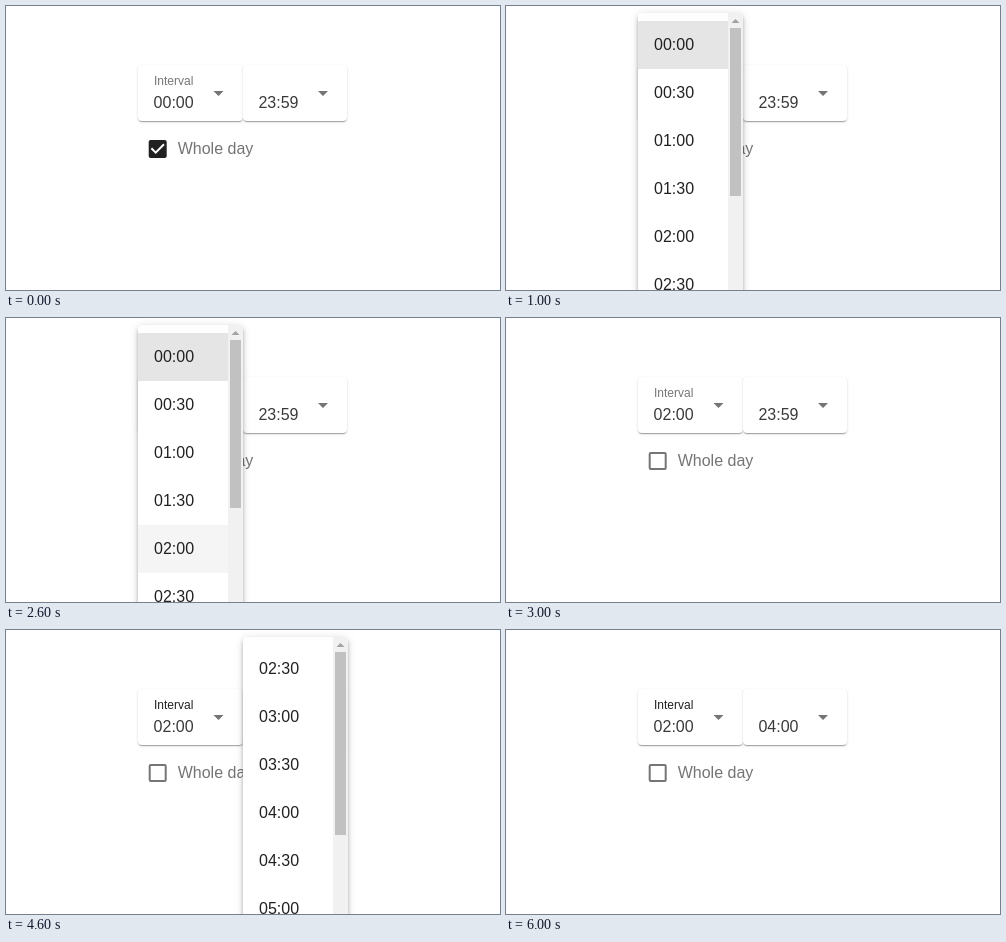
Recreate the animation shown at these times as an HTML page. Size 494 by 284 pixels, loop 7 s.

```html
<!DOCTYPE html>
<html lang="en">
<head>
<meta charset="utf-8">
<title>Interval picker</title>
<style>
  html, body { margin: 0; height: 100%; overflow: hidden; background: #fff; }
  #stage { position: relative; width: 494px; height: 284px; overflow: hidden; }
  #stage > * { position: absolute; }

  svg { position: absolute; left: 0; top: 0; overflow: visible; }
  text { font: 16px "Liberation Sans", Arial, sans-serif; fill: #212121; }
  .value { fill: #3a3a3a; }
  .label { font-size: 12px; fill: #757575; }
  .muted { fill: #757575; }

  .card {
    top: 59px; height: 56px; border-radius: 4px; background: #fff;
    box-shadow: 0 2px 1px -1px rgba(0,0,0,.2), 0 1px 1px rgba(0,0,0,.14), 0 1px 3px rgba(0,0,0,.12);
  }
  .menu {
    top: 7px; width: 105px; height: 320px; border-radius: 4px; background: #fff;
    box-shadow: 0 2px 4px -1px rgba(0,0,0,.2), 0 4px 5px rgba(0,0,0,.14), 0 1px 10px rgba(0,0,0,.12);
  }
  .menu svg { border-radius: 4px; overflow: hidden; }
  .from { left: 132px; }
  .to { left: 237px; }

  /* Hard switches, one second per seventh of the loop */
  .s { animation: 7s step-end infinite; visibility: hidden; }
  .s-whole { animation-name: whole; }
  .s-part { animation-name: part; }
  .s-late { animation-name: late; }
  .s-early { animation-name: early; }
  .s-final { animation-name: final; }
  .s-menu1 { animation-name: menu1; }
  .s-hover1 { animation-name: hover1; }
  .s-menu2 { animation-name: menu2; }
  .s-hover2 { animation-name: hover2; }
  #interval { animation: focus 7s step-end infinite; }

  @keyframes whole  { 0% { visibility: visible } 42.8571%, 100% { visibility: hidden } }
  @keyframes part   { 0% { visibility: hidden } 42.8571%, 100% { visibility: visible } }
  @keyframes early  { 0% { visibility: visible } 85.7143%, 100% { visibility: hidden } }
  @keyframes final  { 0% { visibility: hidden } 85.7143%, 100% { visibility: visible } }
  @keyframes menu1  { 0% { visibility: hidden } 14.2857% { visibility: visible } 42.8571%, 100% { visibility: hidden } }
  @keyframes hover1 { 0% { visibility: hidden } 28.5714% { visibility: visible } 42.8571%, 100% { visibility: hidden } }
  @keyframes menu2  { 0% { visibility: hidden } 57.1429% { visibility: visible } 85.7143%, 100% { visibility: hidden } }
  @keyframes hover2 { 0% { visibility: hidden } 71.4286% { visibility: visible } 85.7143%, 100% { visibility: hidden } }
  @keyframes focus  { 0% { fill: #757575 } 57.1429%, 100% { fill: #212121 } }
</style>
</head>
<body>
<div id="stage">
  <div class="card from" style="width:104.5px"></div>
  <div class="card to" style="width:104px"></div>

  <svg width="494" height="284">
    <text id="interval" class="label" x="148" y="79">Interval</text>
    <text class="value s s-whole" x="147.6" y="102">00:00</text>
    <text class="value s s-part" x="147.6" y="102">02:00</text>
    <text class="value s s-early" x="252.4" y="102">23:59</text>
    <text class="value s s-final" x="252.4" y="102">04:00</text>
    <path class="muted" d="M207.5 85h10l-5 5zM312 85h10l-5 5z"/>
    <g transform="translate(139.7 131)">
      <path class="s s-whole" fill="#212121" d="M19 3H5c-1.1 0-2 .9-2 2v14c0 1.1.9 2 2 2h14c1.1 0 2-.9 2-2V5c0-1.1-.9-2-2-2zm-9 14l-5-5 1.4-1.4L10 14.2l7.6-7.6L19 8z"/>
      <rect class="s s-part" x="4" y="4" width="16" height="16" rx="1" fill="none" stroke="#757575" stroke-width="2"/>
    </g>
    <text class="muted" x="171.7" y="148">Whole day</text>
  </svg>

  <div class="menu from s s-menu1">
    <svg width="105" height="320">
      <rect y="8" width="90" height="48" fill="#e5e5e5"/>
      <rect class="s s-hover1" y="200" width="90" height="48" fill="#f5f5f5"/>
      <rect x="90" width="15" height="320" fill="#f1f1f1"/>
      <rect x="92" y="15" width="11" height="168" fill="#c1c1c1"/>
      <path d="M93.5 10h8l-4-4z" fill="#a3a3a3"/>
      <text x="16" y="37">00:00</text>
      <text x="16" y="85">00:30</text>
      <text x="16" y="133">01:00</text>
      <text x="16" y="181">01:30</text>
      <text x="16" y="229">02:00</text>
      <text x="16" y="277">02:30</text>
    </svg>
  </div>

  <div class="menu to s s-menu2">
    <svg width="105" height="320">
      <rect class="s s-hover2" y="152" width="90" height="48" fill="#f3f3f3"/>
      <rect x="90" width="15" height="320" fill="#f1f1f1"/>
      <rect x="92" y="15" width="11" height="183" fill="#c1c1c1"/>
      <path d="M93.5 10h8l-4-4z" fill="#a3a3a3"/>
      <text x="16" y="37">02:30</text>
      <text x="16" y="85">03:00</text>
      <text x="16" y="133">03:30</text>
      <text x="16" y="181">04:00</text>
      <text x="16" y="229">04:30</text>
      <text x="16" y="277">05:00</text>
    </svg>
  </div>
</div>
</body>
</html>
```
